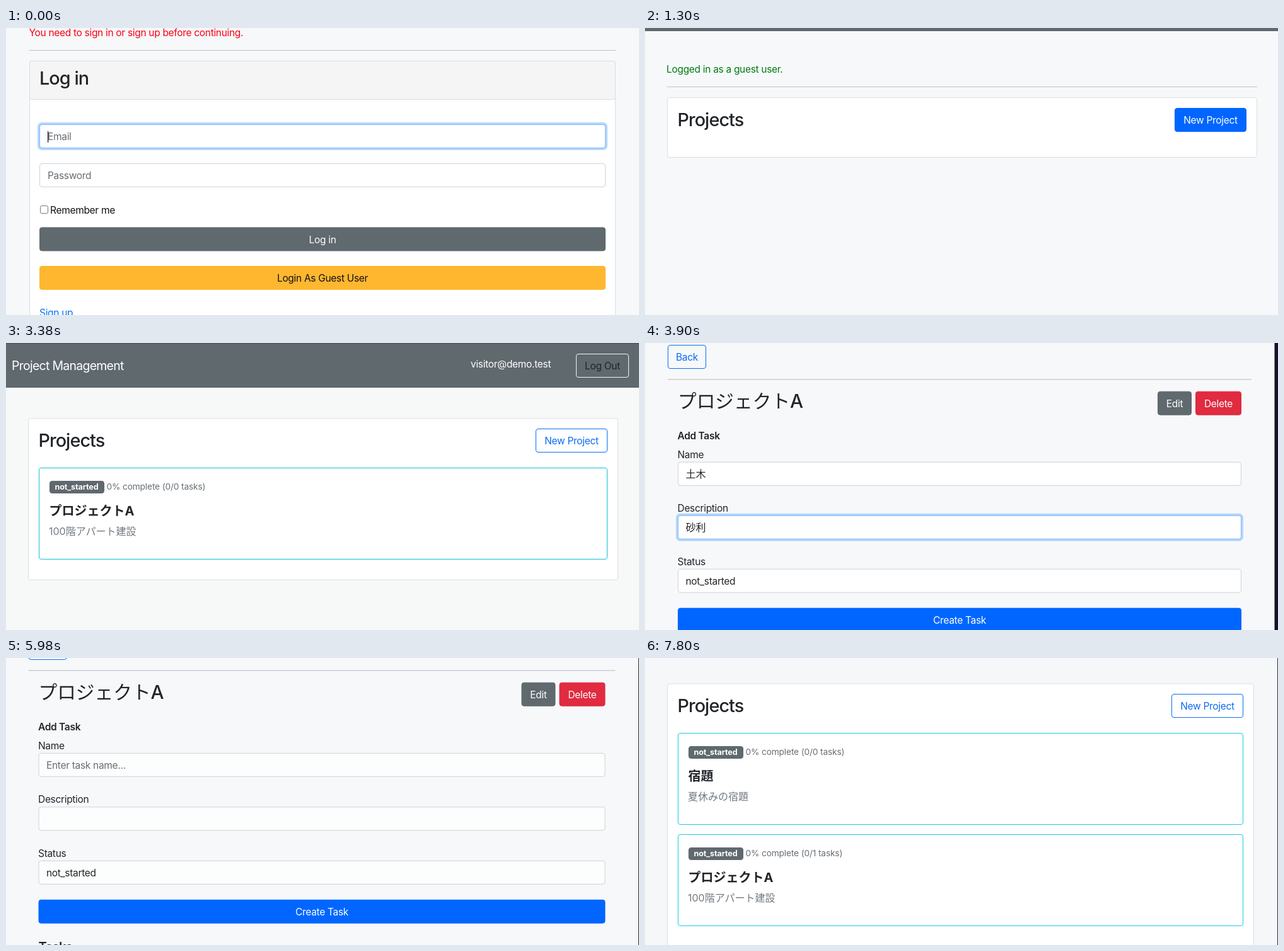
Write an HTML page that moves like this. It is 1004 px wide and 456 px high and loops after 8000 ms.

```html
<!DOCTYPE html>
<html lang="ja">
<head>
<meta charset="utf-8">
<title>Project Management</title>
<style>
  html, body { margin: 0; width: 100%; height: 100%; overflow: hidden; background: #f7f8fa; }
  #stage { position: relative; width: 1004px; height: 456px; overflow: hidden; }
  #reel { animation: cut 8s step-end infinite; }
  svg { display: block; width: 1004px; height: 456px; overflow: hidden; }
  text { font: 400 15.5px Inter, "Noto Sans CJK JP", "Noto Sans CJK", sans-serif; letter-spacing: -.02em; fill: #212529; white-space: pre; }
  .mid { text-anchor: middle; }
  .head { font-size: 28.8px; font-weight: 500; letter-spacing: -.033em; }
  .brand { font-size: 19.4px; letter-spacing: -.035em; }
  .strong { font-weight: 600; }
  .sub { font-size: 20px; font-weight: 600; letter-spacing: -.03em; }
  .badge { font-size: 12.6px; font-weight: 700; letter-spacing: -.01em; }
  .small { font-size: 13.7px; letter-spacing: -.01em; }
  .cjk { font-size: 16px; letter-spacing: 0; }
  .cjkTitle { font-size: 20px; font-weight: 700; letter-spacing: 0; }
  .cjkHead { font-size: 29.7px; font-weight: 500; letter-spacing: 0; }
  @keyframes cut {
    0% { transform: translateY(0); }
    16.25% { transform: translateY(-456px); }
    32.5% { transform: translateY(-912px); }
    48.75% { transform: translateY(-1368px); }
    65% { transform: translateY(-1824px); }
    81.25% { transform: translateY(-2280px); }
    97.5%, 100% { transform: translateY(-2736px); }
  }
</style>
</head>
<body>
<div id="stage"><div id="reel"></div></div>
<script>
const GREY = '#5f696e', BLUE = '#0066ff', LINK = '#0a6cf5', RED = '#e02b40';
const INK = '#212529', MUTED = '#666e74', BORDER = '#ced2d6', CARD = '#dcdddf';

const fill = (x0, y0, x1, y1, color) =>
  `<rect x="${x0}" y="${y0}" width="${x1 - x0}" height="${y1 - y0}" fill="${color}"/>`;

const box = (x0, y0, x1, y1, color, stroke = color, r = 3.5) =>
  `<rect x="${x0 + .5}" y="${y0 + .5}" width="${x1 - x0 - 1}" height="${y1 - y0 - 1}" rx="${r}" fill="${color}" stroke="${stroke}"/>`;

const text = (x, y, str, cls = '', color = INK) =>
  `<text x="${x}" y="${y}" class="${cls}" style="fill:${color}">${str}</text>`;

const button = (x0, y0, x1, label, color, ink = '#fff', stroke = color) =>
  box(x0, y0, x1, y0 + 38, color, stroke) + text((x0 + x1) / 2, y0 + 25, label, 'mid', ink);

const input = (x0, y0, x1, focused, color = '#fff') =>
  (focused ? box(x0 - 3, y0 - 3, x1 + 3, y0 + 41, '#b5d6fd', '#b5d6fd', 6) : '') +
  box(x0, y0, x1, y0 + 38, color, focused ? '#7db5f8' : BORDER);

function login() {
  return text(36.5, 13, 'You need to sign in or sign up before continuing.', '', '#fb0018') +
    fill(37, 35, 967, 36, '#bec0c3') +
    box(37, 52, 967, 480, '#fff', CARD) +
    box(37, 52, 967, 114, '#f5f5f5', CARD) +
    text(53, 90, 'Log in', 'head') +
    input(53, 153, 951, true) + text(66, 178, 'Email', '', MUTED) + fill(66, 164, 67.2, 182, '#111') +
    input(53, 215, 951) + text(66, 240, 'Password', '', MUTED) +
    box(54, 282, 67, 295, '#fff', '#767676', 2) + text(70, 294.5, 'Remember me', '', '#111') +
    button(53, 316.5, 951, 'Log in', GREY) +
    button(53, 378, 951, 'Login As Guest User', '#ffb730', '#111') +
    text(53, 457.5, 'Sign up', '', '#0070f5');
}

function emptyList() {
  return fill(0, 0, 1004, 5, GREY) +
    text(34, 71, 'Logged in as a guest user.', '', '#007a14') +
    fill(35, 93, 971, 94, '#bec0c3') +
    box(35, 110, 971, 206, '#fff', CARD) +
    text(51.5, 156, 'Projects', 'head') +
    button(840, 127, 954, 'New Project', BLUE);
}

function listPanel(top, bottom, right) {
  return box(35, top, right, bottom, '#fff', CARD) +
    text(51.5, top + 45, 'Projects', 'head') +
    button(right - 131, top + 16.5, right - 17, 'New Project', '#fff', LINK, LINK);
}

function project(top, right, tasks, title, about, edge) {
  return box(52, top, right, top + 146, '#fff', edge) +
    box(69, top + 21, 156, top + 41, GREY) +
    text(112, top + 34.5, 'not_started', 'badge mid', '#fff') +
    text(159.5, top + 35, `0% complete (${tasks} tasks)`, 'small', MUTED) +
    text(68.5, top + 75.5, title, 'cjkTitle') +
    text(68, top + 107, about, 'cjk', '#737a80');
}

const apartment = ['プロジェクトA', '100階アパート建設'];

function oneProject() {
  return fill(0, 0, 1004, 71, GREY) + fill(0, 0, 1004, 1, '#4d4a54') +
    text(9, 43, 'Project Management', 'brand', '#fff') +
    text(737, 39, 'visitor@demo.test', '', '#fff') +
    button(904, 17, 988, 'Log Out', 'none', INK, '#f3f5f6') +
    listPanel(119.5, 377, 971) +
    project(198, 954, '0/0', ...apartment, '#14bfd8');
}

function twoProjects() {
  return listPanel(40.5, 480, 966) +
    project(119, 949, '0/0', '宿題', '夏休みの宿題', '#1ccbdc') +
    project(280, 949, '0/1', ...apartment, '#1ccbdc') +
    fill(1003, 0, 1004, 456, '#2a2a30');
}

// Positions are relative to the rule above the title.
function taskForm({ rule, left, right, title, pitch = 85.5, name, about, paper = '#fff', edge = '' }) {
  const hr = y => fill(left - 16, y, right + 16, y + 1.3, '#c6c9cc');
  const tops = [0, 1, 2].map(i => 130.8 + i * pitch);
  const field = (i, label, value, focused) =>
    text(left - .5, tops[i] - 6, label) + input(left, tops[i], right, focused, paper) + value;
  const value = (i, str, cls = '', color = INK) => text(left + 12.5, tops[i] + 25, str, cls, color);
  const nameValue = name ? value(0, name, 'cjk') : value(0, 'Enter task name...', '', MUTED);
  return `<g transform="translate(0 ${rule})">` +
    hr(-71.5) + button(left - 16, -55, left + 45, 'Back', '#fff0', LINK, LINK) + hr(-.8) +
    text(left, 45, title, 'cjkHead') +
    button(right - 133, 18.7, right - 79, 'Edit', GREY) +
    button(right - 73, 18.7, right, 'Delete', RED) +
    text(left - .5, 95, 'Add Task', 'strong') +
    field(0, 'Name', nameValue) +
    field(1, 'Description', about ? value(1, about, 'cjk') : '', !!about) +
    field(2, 'Status', value(2, 'not_started')) +
    button(left, tops[2] + 62, right, 'Create Task', BLUE) +
    text(left, 445.5, 'Tasks', 'sub') + '</g>' + edge;
}

const scenes = [
  ['#f7f8fa', login()],
  ['#f7f8fa', emptyList()],
  ['#f7f9f9', oneProject()],
  ['#f7f8fa', taskForm({ rule: 58, left: 52, right: 946, title: 'プロジェクトA', pitch: 85,
    name: '土木', about: '砂利', edge: fill(998.5, 0, 1004, 456, '#17112b') })],
  ['#f7f8fa', taskForm({ rule: 20, left: 51.5, right: 950.5, title: 'プロジェクトA',
    paper: '#fcfefd', edge: fill(1003, 0, 1004, 456, '#2a2a30') })],
  ['#f7f8fa', taskForm({ rule: 81, left: 52.5, right: 952.5, title: '宿題' })],
  ['#f6f7f9', twoProjects()],
];

document.getElementById('reel').innerHTML = scenes.map(([paper, art]) =>
  `<svg viewBox="0 0 1004 456">${fill(0, 0, 1004, 456, paper)}${art}</svg>`).join('');
</script>
</body>
</html>
```
